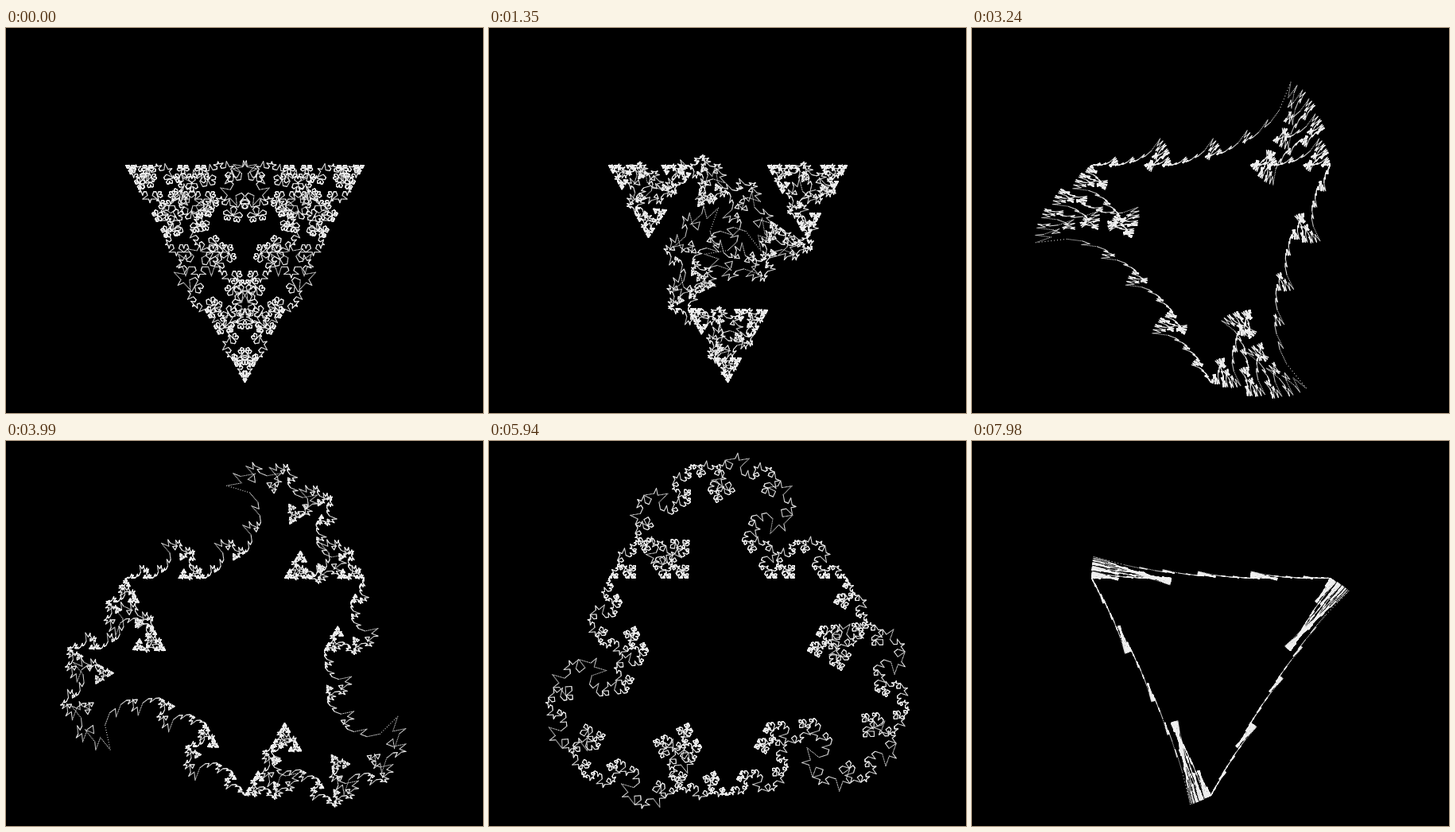
Write an HTML page with a canvas that moves like this. It is 600 px wide and 484 px high and loops after 8000 ms.

```html
<!DOCTYPE html>
<html lang="en">
<head>
<meta charset="utf-8">
<title>Turning Koch curve</title>
<style>
html, body { margin: 0; width: 100%; height: 100%; overflow: hidden; background: #000; }
canvas { display: block; }
</style>
</head>
<body>
<canvas id="stage" width="600" height="484"></canvas>
<script>
const W = 600, H = 484, LOOP = 8000, STEP = 30;
const DEPTH = 5, DOTS = 10, LIGHT = 240;
const CORNERS = [[150, 172], [450, 172], [300, 445]];
const ctx = document.getElementById('stage').getContext('2d');
const image = ctx.createImageData(W, H);
const pixels = new Uint32Array(image.data.buffer);
const cover = new Float32Array(W * H);

let turnX, turnY;

function blend(x, y, amount) {
  if (x < 0 || x >= W || y < 0 || y >= H) return;
  const i = y * W + x;
  cover[i] += (1 - cover[i]) * amount;
}

// A soft dot, one pixel wide, shared between its four neighbours.
function dot(x, y) {
  const px = Math.floor(x), py = Math.floor(y), fx = x - px, fy = y - py;
  blend(px, py, (1 - fx) * (1 - fy));
  blend(px + 1, py, fx * (1 - fy));
  blend(px, py + 1, (1 - fx) * fy);
  blend(px + 1, py + 1, fx * fy);
}

function dottedLine(ax, ay, dx, dy) {
  for (let i = 0; i < DOTS; i++) dot(ax + dx * i / DOTS, ay + dy * i / DOTS);
}

// The apex circles the middle of the segment at half its length.
function koch(ax, ay, bx, by, depth) {
  const dx = bx - ax, dy = by - ay;
  if (depth === 0) return dottedLine(ax, ay, dx, dy);
  const px = ax + dx / 3, py = ay + dy / 3;
  const qx = bx - dx / 3, qy = by - dy / 3;
  const cx = (ax + bx + dx * turnX - dy * turnY) / 2;
  const cy = (ay + by + dy * turnX + dx * turnY) / 2;
  koch(ax, ay, px, py, depth - 1);
  koch(px, py, cx, cy, depth - 1);
  koch(cx, cy, qx, qy, depth - 1);
  koch(qx, qy, bx, by, depth - 1);
}

function draw(time) {
  const angle = Math.floor(time / STEP) * Math.PI / 180;
  turnX = Math.sin(angle);
  turnY = Math.cos(angle);
  cover.fill(0);
  CORNERS.forEach((from, i) => koch(...from, ...CORNERS[(i + 1) % 3], DEPTH));
  for (let i = 0; i < pixels.length; i++) {
    pixels[i] = 0xff000000 + Math.round(cover[i] * LIGHT) * 0x010101;
  }
  ctx.putImageData(image, 0, 0);
}

const start = performance.now();
function tick() {
  draw((performance.now() - start) % LOOP);
  requestAnimationFrame(tick);
}
tick();
</script>
</body>
</html>
```
